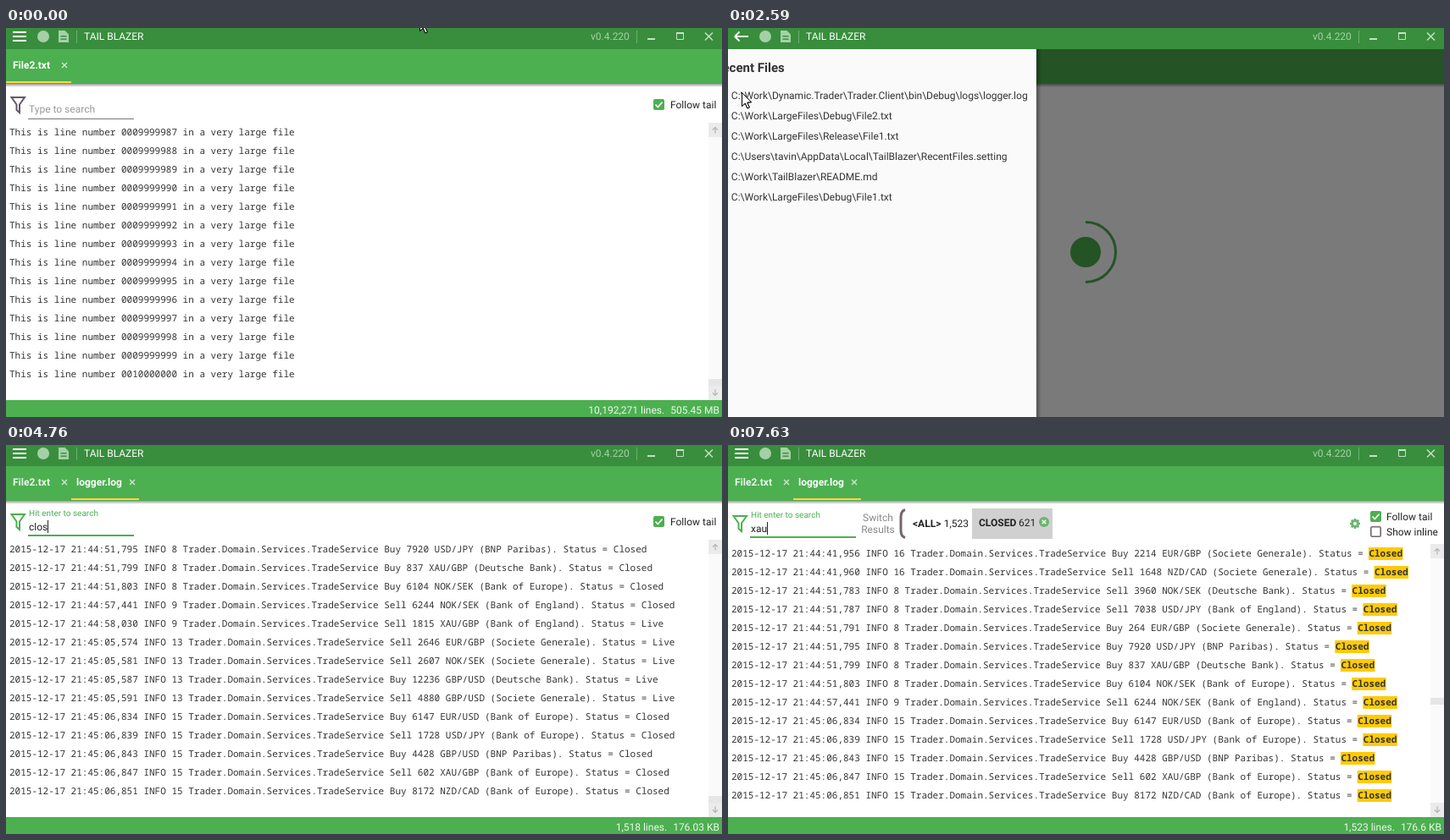
An HTML page with a canvas for the animation above (8 s loop, 845 by 460 pixels).

```html
<!DOCTYPE html>
<html lang="en">
<head>
<meta charset="utf-8">
<title>Tail Blazer</title>
<style>
html, body { margin: 0; width: 100%; height: 100%; overflow: hidden; background: #fff; }
canvas { display: block; }
</style>
</head>
<body>
<canvas id="stage" width="845" height="460"></canvas>
<script>
const W = 845, H = 460, LOOP = 8000, STEP = 70;
const ctx = document.getElementById('stage').getContext('2d');
ctx.textRendering = 'geometricPrecision';

const GREEN = '#4caf50', DARK = '#388e3c', PALE = '#a5d0a7', AMBER = '#ffd740', INK = '#333';
const UI = 'Roboto, sans-serif', MONO = '"Noto Sans Mono", monospace';
const CHAR = 6.6, ROW = 22;

const BANKS = {
  S: 'Societe Generale', D: 'Deutsche Bank', E: 'Bank of England',
  U: 'Bank of Europe', B: 'BNP Paribas'
};
const LOG = `44:41,956 16 Buy 2214 EUR/GBP S Closed
44:41,960 16 Sell 1648 NZD/CAD S Closed
44:51,783 8 Sell 3960 NOK/SEK D Closed
44:51,787 8 Sell 7038 USD/JPY E Closed
44:51,791 8 Buy 264 EUR/GBP S Closed
44:51,795 8 Buy 7920 USD/JPY B Closed
44:51,799 8 Buy 837 XAU/GBP D Closed
44:51,803 8 Buy 6104 NOK/SEK U Closed
44:57,441 9 Sell 6244 NOK/SEK E Closed
44:58,030 9 Sell 1815 XAU/GBP E Live
45:05,574 13 Sell 2646 EUR/GBP S Live
45:05,581 13 Sell 2607 NOK/SEK S Live
45:05,587 13 Buy 12236 GBP/USD D Live
45:05,591 13 Sell 4880 GBP/USD S Live
45:06,834 15 Buy 6147 EUR/USD U Closed
45:06,839 15 Sell 1728 USD/JPY U Closed
45:06,843 15 Buy 4428 GBP/USD B Closed
45:06,847 15 Sell 602 XAU/GBP U Closed
45:06,851 15 Buy 8172 NZD/CAD U Closed`.split('\n').map(line => {
  const [time, thread, side, qty, pair, bank, status] = line.split(' ');
  return {
    status,
    head: `2015-12-17 21:${time} INFO ${thread} Trader.Domain.Services.TradeService ` +
      `${side} ${qty} ${pair} (${BANKS[bank]}). Status = `
  };
});
LOG.push({
  status: '', fresh: true,
  head: '2015-12-17 21:45:15,870 INFO 16 Trader.Domain.Services.TradeService 29 filled trades have been removed from memory'
});
const CLOSED = LOG.filter(r => r.status === 'Closed');
const BIG = Array.from({ length: 14 }, (_, i) => ({
  status: '', head: `This is line number ${String(9999987 + i).padStart(10, '0')} in a very large file`
}));
const RECENT = [
  'C:\\Work\\Dynamic.Trader\\Trader.Client\\bin\\Debug\\logs\\logger.log',
  'C:\\Work\\LargeFiles\\Debug\\File2.txt',
  'C:\\Work\\LargeFiles\\Release\\File1.txt',
  'C:\\Users\\tavin\\AppData\\Local\\TailBlazer\\RecentFiles.setting',
  'C:\\Work\\TailBlazer\\README.md',
  'C:\\Work\\LargeFiles\\Debug\\File1.txt'
];

// time, x, y of the pointer tip
const PATH = [
  [280, 488, -13], [560, 340, 2], [840, 80, 14], [980, 3, 20], [1120, 13, 15], [1190, 15, 12],
  [1400, 15, 15], [1540, 12, 32], [1890, 6, 82], [1960, 6, 82], [2030, 12, 69], [2100, 16, 76],
  [2660, 16, 76], [3150, 121, 42], [3430, 121, 42], [3780, 55, 88], [5530, 55, 88],
  [5600, 70, 91], [6090, 368, 87]
];
const CARET_FLIPS = [3850, 4270, 4550, 6090, 6580, 7070, 7210];

const clamp = v => Math.min(1, Math.max(0, v));
const mix = (a, b, k) => a + (b - a) * k;
const span = (t, start, len) => clamp((t - start) / len);
const easeOut = k => 1 - (1 - k) ** 3;
const sine = k => (1 - Math.cos(Math.PI * k)) / 2;

function rect(x, y, w, h, color) {
  ctx.fillStyle = color;
  ctx.fillRect(x, y, w, h);
}
function dot(x, y, r, color) {
  ctx.fillStyle = color;
  ctx.beginPath();
  ctx.arc(x, y, r, 0, 7);
  ctx.fill();
}
function text(s, x, y, color = INK, size = 12, weight = 400, align = 'left', family = UI) {
  ctx.font = `${weight} ${size}px ${family}`;
  ctx.textAlign = align;
  ctx.fillStyle = color;
  ctx.fillText(s, x, y);
  return ctx.measureText(s).width;
}
function line(points, color, width, close) {
  ctx.strokeStyle = color;
  ctx.lineWidth = width;
  ctx.beginPath();
  points.forEach(([x, y]) => ctx.lineTo(x, y));
  if (close) ctx.closePath();
  ctx.stroke();
}
function cross(x, y, r, color, width) {
  line([[x - r, y - r], [x + r, y + r]], color, width);
  line([[x - r, y + r], [x + r, y - r]], color, width);
}
function shade(x, y, w, h, dx, dy, alpha) {
  const g = ctx.createLinearGradient(x, y, x + dx, y + dy);
  g.addColorStop(0, `rgba(0,0,0,${alpha})`);
  g.addColorStop(1, 'rgba(0,0,0,0)');
  rect(x, y, w, h, g);
}

function menuIcon(k) {
  ctx.save();
  ctx.translate(16, 10);
  ctx.rotate(Math.PI * (1 - k));
  line([[-8, 0], [8, 0]], '#fff', 2);
  for (const s of [-1, 1])
    line([[-8, s * mix(5, 0, k)], [mix(8, -2.5, k), s * mix(5, 5.5, k)]], '#fff', 2);
  ctx.restore();
}

function titleBar(k) {
  rect(0, 0, W, 25, DARK);
  menuIcon(k);
  dot(44, 10, 7, PALE);
  ctx.fillStyle = PALE;
  ctx.beginPath();
  [[62, 3], [69.5, 3], [74, 7.5], [74, 17], [62, 17]].forEach(([x, y]) => ctx.lineTo(x, y));
  ctx.fill();
  rect(64.5, 9, 7, 1.4, DARK);
  rect(64.5, 12.5, 7, 1.4, DARK);
  rect(83, 3, 1, 15, '#6fae72');
  text('TAIL BLAZER', 92, 14, '#fff');
  text('v0.4.220', 690, 14, PALE);
  rect(744, 3, 1, 15, '#6fae72');
  rect(757, 12, 9, 2, '#c5e1c6');
  line([[791.5, 6.5], [799.5, 6.5], [799.5, 13.5], [791.5, 13.5]], '#c5e1c6', 1, true);
  rect(791, 5, 9, 2, '#c5e1c6');
  cross(829.5, 10, 4.5, '#c5e1c6', 1.5);
}

function header() {
  rect(0, 25, W, 41, GREEN);
  shade(0, 66, W, 4, 0, 4, 0.4);
}

function tabs(t, log) {
  text('File2.txt', 8, 48, log ? '#eaf6eb' : '#fff', 12, 700);
  cross(69, 44, 3, '#d3ebd4', 1.2);
  if (log) {
    text('logger.log', 83, 48, '#fff', 12, 700);
    cross(149, 44, 3, '#d3ebd4', 1.2);
    const k = span(t, 3220, 420);
    if (k > 0 && k < 1) {
      ctx.save();
      ctx.beginPath();
      ctx.rect(77, 25, 80, 41);
      ctx.clip();
      dot(122, 44, 50 * k, `rgba(255,255,255,${0.22 * (1 - k)})`);
      ctx.restore();
    }
  }
  rect(log ? 77 : 0, 63, log ? 80 : 77, 2, AMBER);
}

function typed(t) {
  if (t >= 7210) return 'xau'.slice(0, t >= 7560 ? 3 : t >= 7350 ? 2 : 1);
  if (t < 4550 || t >= 5530) return '';
  return 'closed'.slice(0, t >= 4970 ? 6 : Math.min(5, 1 + (t - 4550) / STEP));
}

function searchBox(t, dy) {
  const focus = t >= 3780, value = typed(t);
  const lift = t >= 7210 ? easeOut(span(t, 7140, 280))
    : easeOut(span(t, 4480, 280)) * (1 - sine(span(t, 5530, 350)));
  ctx.save();
  ctx.translate(0, dy);
  line([[6.5, 82], [22, 82], [16, 90.5], [16, 100], [12.5, 97], [12.5, 90.5]], focus ? GREEN : '#62586a', 2, true);
  if (focus) {
    const half = 62.5 * easeOut(span(t, 3710, 210));
    rect(26, 107, 125, 1, '#777');
    rect(88.5 - half, 106, half * 2, 2, GREEN);
  } else rect(26, 107, 125, 1, '#777');
  text(value ? 'Hit enter to search' : 'Type to search', 27, mix(100, 84, lift),
    value ? GREEN : lift > 0.5 ? '#222' : '#999', mix(12, 10, lift));
  const w = text(value, 27, 101, '#222');
  if (CARET_FLIPS.filter(f => f <= t).length % 2) rect(Math.round(27 + w), 89, 1, 15, '#222');
  ctx.restore();
}

function checkBox(x, y, on, label, lx) {
  ctx.beginPath();
  if (on) {
    ctx.roundRect(x, y, 13, 13, 2);
    ctx.fillStyle = GREEN;
    ctx.fill();
    line([[x + 2.5, y + 6.5], [x + 5.3, y + 9.5], [x + 10.5, y + 3.7]], '#fff', 1.7);
  } else {
    ctx.roundRect(x + 0.8, y + 0.8, 11.4, 11.4, 1.5);
    ctx.strokeStyle = '#75656e';
    ctx.lineWidth = 1.6;
    ctx.stroke();
  }
  text(label, lx, y + 10.5, '#222');
}

function gear(x, y) {
  const color = '#6bb46e';
  for (let i = 0; i < 4; i++) {
    const a = i * Math.PI / 4, c = Math.cos(a) * 6, s = Math.sin(a) * 6;
    line([[x - c, y - s], [x + c, y + s]], color, 2.6);
  }
  dot(x, y, 4.7, color);
  dot(x, y, 2, '#fff');
}

function resultTabs(t, lines) {
  const all = t < 5880, counted = t >= 5740, end = counted ? 383 : 363;
  text('Switch', 177, 90, '#888', 12, 400, 'center');
  text('Results', 177, 104, '#888', 12, 400, 'center');
  if (all) rect(208, 75, 80, 36, '#d0d0d0');
  else rect(288, 75, end - 288, 36, '#d0d0d0');
  ctx.strokeStyle = '#75656e';
  ctx.lineWidth = all ? 4.5 : 3;
  ctx.beginPath();
  ctx.moveTo(209, 76.5);
  ctx.quadraticCurveTo(204, 78, 204, 85);
  ctx.lineTo(204, 101);
  ctx.quadraticCurveTo(204, 108, 209, 109.5);
  ctx.stroke();
  text('<ALL>', 218, 97, '#222', 12, 700);
  text(lines, 284, 97, '#222', 12, 400, 'right');
  text('CLOSED', 296, 96, '#222', 12, 700);
  if (counted) text('621', 343, 96, '#222');
  dot(end - 10, 91, 6, '#6bb46e');
  cross(end - 10, 91, 2.3, '#fff', 1.5);
}

function list(rows, dy, marked, t) {
  rows.forEach((r, i) => {
    const y = 127 + dy + i * ROW;
    if (r.fresh) rect(0, y - 16, 829, ROW, '#ffd956');
    text(r.head, 4, y, INK, 11, 400, 'left', MONO);
    if (!r.status) return;
    const x = 4 + r.head.length * CHAR, hit = marked && r.status === 'Closed';
    if (hit) rect(x - 0.5, y - 11, 6 * CHAR + 1, 15, '#ffcb08');
    text(r.status, x, y, INK, 11, hit ? 700 : 400, 'left', MONO);
  });
}

function scrollBar(dy, thumb) {
  const x = 837, color = '#b4b4b4';
  rect(829, 112 + dy, 16, 328 - dy, '#fafafa');
  rect(829, 112 + dy, 16, 17, '#ebebeb');
  rect(829, 423, 16, 17, '#ebebeb');
  rect(829, thumb, 16, 8, '#e6e6e6');
  for (const [y, s] of [[121 + dy, -1], [431, 1]]) {
    line([[x, y - 3.5], [x, y + 3.5]], color, 1.2);
    line([[x - 3, y + s * 0.5], [x, y + s * 3.5], [x + 3, y + s * 0.5]], color, 1.2);
  }
}

function statusBar(lines, size) {
  rect(0, 440, W, 20, GREEN);
  const w = text(size, 842, 456, '#f0f8f0', 12, 400, 'right');
  text(lines + ' lines.', 842 - w - 7, 456, '#f0f8f0', 12, 400, 'right');
}

function splash(t) {
  const a = (t - 2590) / 1400 * Math.PI * 2 - Math.PI / 2;
  header();
  dot(422, 265, 18, GREEN);
  ctx.strokeStyle = GREEN;
  ctx.lineWidth = 3;
  ctx.beginPath();
  ctx.arc(422, 265, 35.5, a, a + Math.PI);
  ctx.stroke();
}

function page(t) {
  const log = t >= 3080, found = t >= 5250, closed = t >= 5880;
  const dy = found ? 5 : 0;
  const [lines, size] = !log ? ['10,192,271', '505.45 MB']
    : t < 5530 ? ['1,518', '176.03 KB']
    : t < 6720 ? ['1,519', '176.14 KB'] : ['1,523', '176.6 KB'];
  header();
  tabs(t, log);
  searchBox(t, found ? 2 : 0);
  if (found) {
    resultTabs(t, lines);
    gear(740, 93);
    checkBox(758, 78, true, 'Follow tail', 777);
    checkBox(758, 96, false, 'Show inline', 777);
  } else checkBox(764, 84, true, 'Follow tail', 784);
  const from = t < 5530 ? 5 : 6;
  list(!log ? BIG : closed ? CLOSED : LOG.slice(from, from + 14), dy, found, t);
  scrollBar(dy, closed ? 299 : 415);
  statusBar(lines, size);
}

function drawer(open, dim) {
  if (dim > 0) rect(0, 25, W, H, `rgba(0,0,0,${0.56 * dim})`);
  if (open <= 0) return;
  const x = 390 * (open - 1);
  shade(x + 390, 25, 6, H, 6, 0, 0.35);
  rect(x, 25, 390, H, '#fafafa');
  text('Recent Files', x + 10, 52, INK, 15, 700);
  RECENT.forEach((p, i) => text(p, x + 30, 84 + i * 24, INK));
}

function pointer(t) {
  if (t >= 7210 || (t >= 4550 && t < 5530)) return;
  let i = PATH.findIndex(p => p[0] > t);
  if (i < 0) i = PATH.length;
  const a = PATH[Math.max(0, i - 1)], b = PATH[Math.min(i, PATH.length - 1)];
  const k = b[0] > a[0] ? (t - a[0]) / (b[0] - a[0]) : 0;
  ctx.save();
  ctx.translate(mix(a[1], b[1], k) + 0.5, mix(a[2], b[2], k) + 0.5);
  const shape = [[0, 0], [0, 16], [3.8, 12.6], [6.4, 18.5], [8.8, 17.5], [6.2, 11.6], [11, 11.2]];
  line(shape, '#000', 1, true);
  ctx.fillStyle = '#fff';
  ctx.fill();
  ctx.stroke();
  ctx.restore();
}

function draw(now) {
  const t = Math.floor((now % LOOP) / STEP) * STEP;
  const out = sine(span(t, 2520, 420));
  const show = k => t < 1400 ? 0 : k;
  rect(0, 0, W, H, '#fff');
  if (t >= 2450 && t < 3080) splash(t);
  else page(t);
  drawer(show(easeOut(span(t, 1350, 440)) - out), show(easeOut(span(t, 1350, 290)) - out));
  titleBar(show(easeOut(span(t, 1370, 440)) - sine(span(t, 2590, 420))));
  pointer(t);
}

const start = performance.now();
function tick() {
  draw(performance.now() - start);
  requestAnimationFrame(tick);
}
tick();
</script>
</body>
</html>
```
